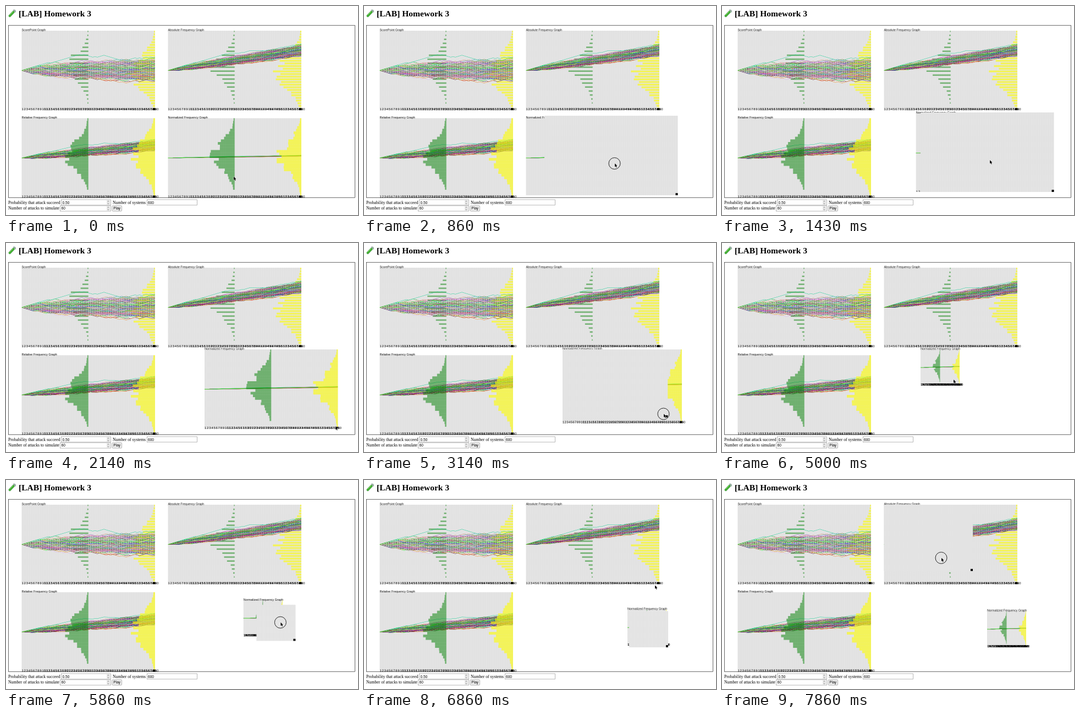
An HTML page with a canvas for the animation above (8000 ms loop, 640 by 381 pixels).

```html
<!DOCTYPE html>
<html lang="en">
<head>
<meta charset="utf-8">
<title>Homework 3</title>
<style>
  html, body { margin: 0; width: 100%; height: 100%; overflow: hidden; background: #fff; }
  canvas, svg { position: absolute; left: 0; top: 0; }
  text { font: 7.72px "Liberation Serif", "Times New Roman", serif; }
  .field text { font: 6.6px "Liberation Sans", Arial, sans-serif; }
  .field rect { fill: #fff; stroke: #858585; stroke-width: .6; }
</style>
</head>
<body>
<canvas id="stage" width="640" height="381"></canvas>
<svg width="640" height="381">
  <g stroke-linecap="round" fill="none">
    <path d="M15.5 9 6.8 18" stroke="#9db5a5" stroke-width="4.8"/>
    <path d="M13.5 11 6.8 18" stroke="#3fae2f" stroke-width="3.8"/>
    <path d="M13.8 7 17.6 10.8" stroke="#9aaba6" stroke-width="1.4"/>
    <path d="M12.5 10.5 7 16.2" stroke="#8bdc70" stroke-width="1"/>
  </g>
  <text x="23" y="19" style="font-size:15.55px;font-weight:bold">[LAB] Homework 3</text>
  <rect x="4.3" y="35.2" width="630" height="314" fill="none" stroke="#000" stroke-width=".6"/>
  <text x="4" y="360.5">Probability that attack succeed</text>
  <text x="194" y="360.5">Number of systems</text>
  <text x="4" y="371.3">Number of attacks to simulate</text>
  <g class="field">
    <rect x="100.5" y="353" width="90" height="10"/><text x="102.5" y="360.5">0.50</text>
    <rect x="256.5" y="353" width="91" height="10"/><text x="258" y="360.5">600</text>
    <rect x="98.5" y="364" width="92" height="10"/><text x="100.5" y="371.3">60</text>
    <rect x="193" y="364" width="17.5" height="10" rx="1.5" style="fill:#efefef"/><text x="195.3" y="371.3">Play</text>
  </g>
  <g fill="#e8e8e8"><rect x="183" y="354" width="6" height="8"/><rect x="183" y="365" width="6" height="8"/></g>
  <path d="M184.5 357l1.5-1.6 1.5 1.6M184.5 359.3l1.5 1.6 1.5-1.6M184.5 368l1.5-1.6 1.5 1.6M184.5 370.3l1.5 1.6 1.5-1.6" fill="none" stroke="#666" stroke-width=".6"/>
</svg>
<script>
const FPS = 7, LOOP = 8000, STEPS = 60, SYSTEMS = 300, W = 242.5, H = 145;
const GREEN = 'rgba(0,128,0,.5)', YELLOW = 'rgba(255,255,0,.6)';
const ctx = document.getElementById('stage').getContext('2d');

function seeded(seed) {
  return () => {
    seed = seed + 0x6D2B79F5 | 0;
    let t = Math.imul(seed ^ seed >>> 15, 1 | seed);
    t = t + Math.imul(t ^ t >>> 7, 61 | t) ^ t;
    return ((t ^ t >>> 14) >>> 0) / 4294967296;
  };
}

const rand = seeded(11);
const walks = Array.from({ length: SYSTEMS }, (_, i) => {
  const score = [0];
  for (let n = 0; n < STEPS; n++) score.push(score[n] + (rand() < .5 ? 1 : -1));
  const [r, g, b] = [rand(), rand(), rand()].map(v => Math.floor(v * 256));
  return { score, color: i > SYSTEMS - 4 ? `rgb(${r >> 1},${190 + (g >> 2)},${b >> 1})` : `rgb(${r},${g},${b})` };
});

// Each key is [step, x, y, width, height]; drift and spread place a walk's height.
const panels = [
  { name: 'ScorePoint Graph', drift: 0, spread: 1, keys: [[0, 28.5, 45, W, H]] },
  { name: 'Absolute Frequency Graph', drift: .5, spread: .5,
    keys: [[0, 294.5, 45, W, H], [54, 294.5, 45, W, H], [55, 294.5, 45, 161.5, 121]] },
  { name: 'Relative Frequency Graph', drift: .31, spread: .48, solid: true, keys: [[0, 28.5, 204.5, W, H]] },
  { name: 'Normalized Frequency Graph', drift: .055, spread: .04, solid: true, moves: true,
    keys: [[0, 294.5, 204.5, W, H], [5, 294.5, 204.5, W, H], [6, 328, 200, W, H], [10, 361, 194, W, H],
      [20, 361, 194, W, H], [24, 361, 194, 140, 103], [25, 361, 194, 114, 91], [26, 361, 194, 101, 84],
      [28, 361, 194, 71, 66], [37, 361, 194, 71, 66], [42, 479, 236, 71, 66], [43, 482, 239, 71, 66]] }
];

const pointer = [[0, 414, 311], [2, 417, 300], [4, 420, 292], [6, 456, 287], [10, 487, 281], [15, 599, 334],
  [20, 600, 336], [24, 490, 287], [26, 438, 262], [28, 428, 256], [33, 424, 252], [35, 421, 249], [37, 405, 226],
  [42, 523, 268], [44, 526, 271], [48, 529, 192], [50, 534, 187], [53, 534, 187], [55, 399, 142]];
const presses = [[4, 10], [18, 28], [37, 44], [52, 56]];

function sample(keys, step) {
  const i = keys.findIndex(k => k[0] > step);
  if (i < 0) return keys[keys.length - 1].slice(1);
  const a = keys[i - 1], b = keys[i], f = (step - a[0]) / (b[0] - a[0]);
  return a.slice(1).map((v, j) => v + (b[j + 1] - v) * f);
}

function drawBase(c, [x, y, w, h]) {
  c.fillStyle = '#e2e2e2';
  c.fillRect(x, y, w, h);
  c.strokeStyle = '#e8e8e8';
  c.lineWidth = 1;
  c.setLineDash([1, 1]);
  c.beginPath();
  for (let n = 1; n < STEPS; n++) {
    const gx = x + n * w / STEPS;
    c.moveTo(gx, y);
    c.lineTo(gx, y + h);
  }
  c.stroke();
  c.setLineDash([]);
}

function drawHandle(c, [x, y, w, h]) {
  c.fillStyle = '#000';
  c.fillRect(x + w - 4, y + h - 4, 4, 4);
}

function drawBars(c, [x, y, w, h], right, { rows, fill, peak, center, sigma, last = 1, color, seed }) {
  const rnd = seeded(seed), pitch = h / rows;
  c.fillStyle = color;
  for (let i = 0; i < rows * last; i++) {
    const z = ((i + .5) / rows - center) / sigma;
    const len = (peak * Math.exp(-z * z / 2) * (.75 + .5 * rnd()) + .8) * w / W;
    c.fillRect(x + right * w - len, y + i * pitch, len, pitch * fill);
  }
}

function drawHistograms(c, p, box) {
  const seed = p.name.length;
  drawBars(c, box, .5, p.solid
    ? { rows: 30, fill: 1, peak: 38, center: .47, sigma: .17, last: .9, color: GREEN, seed }
    : { rows: 20, fill: .34, peak: 42, center: .48, sigma: .155, last: .94, color: GREEN, seed });
  drawBars(c, box, 1, p.solid
    ? { rows: 30, fill: 1, peak: 38, center: .48, sigma: .19, color: YELLOW, seed: seed + 40 }
    : { rows: 30, fill: .7, peak: 44, center: .53, sigma: .19, color: YELLOW, seed: seed + 40 });
}

function drawWalks(c, p, [x, y, w, h]) {
  c.lineWidth = .5;
  for (const { score, color } of walks) {
    c.strokeStyle = color;
    c.beginPath();
    score.forEach((s, n) => c.lineTo(x + n * w / STEPS, y + h / 2 - (p.drift * n + p.spread * s) * h / 120));
    c.stroke();
  }
}

// Panels are rendered at double size so that thin lines keep their gaps.
const cache = {};
function fullPanel(p, box) {
  const key = p.name + box;
  if (cache[key]) return cache[key];
  const canvas = document.createElement('canvas');
  canvas.width = 1280;
  canvas.height = 762;
  const c = canvas.getContext('2d'), [x, y, w, h] = box;
  c.scale(2, 2);
  drawBase(c, box);
  const layers = p.solid ? [drawWalks, drawHistograms] : [drawHistograms, drawWalks];
  layers.forEach(draw => draw(c, p, box));
  drawHandle(c, box);
  c.font = '5.8px "Liberation Sans", Arial, sans-serif';
  for (let n = 0; n < STEPS; n++) c.fillText(n + 1, x + n * w / (STEPS - 1), y + h);
  c.font = '5.5px "Liberation Sans", Arial, sans-serif';
  c.fillText(p.name, x, y + .6);
  return cache[key] = canvas;
}

// While a panel is dragged, its new box is blank and lies over what was drawn before.
function drawPanel(p, step) {
  const box = sample(p.keys, step), [x, y, w, h] = box;
  const settling = p.moves && step > 42 && step < 49;
  const old = sample(p.keys, settling ? 42 : Math.max(0, step - 1));
  const changed = String(old) !== String(box);
  ctx.save();
  ctx.beginPath();
  const top = p.moves && step > 6 && step < 38 ? Math.min(y, old[1]) - 3.5 : 0;
  const moved = changed && (x !== old[0] || y !== old[1]);
  ctx.rect(0, top, 640, (moved ? y + h : 381) - top);
  ctx.clip();
  ctx.drawImage(fullPanel(p, old), 0, 0, 640, 381);
  if (changed) {
    drawBase(ctx, box);
    drawHandle(ctx, box);
  }
  ctx.restore();
}

function drawPointer(step) {
  const [x, y] = sample(pointer, step);
  if (presses.some(([a, b]) => step >= a && step < b)) {
    ctx.strokeStyle = '#111';
    ctx.lineWidth = .9;
    ctx.beginPath();
    ctx.arc(x - .5, y, 10.5, 0, 7);
    ctx.stroke();
  }
  ctx.save();
  ctx.translate(x, y);
  const arrow = new Path2D('M0 0V6.3L1.5 5 2.6 7.5 3.7 7 2.6 4.6H4.6Z');
  ctx.strokeStyle = '#fff';
  ctx.lineWidth = .8;
  ctx.stroke(arrow);
  ctx.fillStyle = '#000';
  ctx.fill(arrow);
  ctx.restore();
}

const start = performance.now();
let shown = -1;
function tick() {
  const time = (performance.now() - start) % LOOP;
  const step = Math.min(55, Math.floor((time + 5) * FPS / 1000));
  if (step !== shown) {
    shown = step;
    ctx.clearRect(0, 0, 640, 381);
    panels.forEach(p => drawPanel(p, step));
    drawPointer(step);
  }
  requestAnimationFrame(tick);
}
tick();
</script>
</body>
</html>
```
